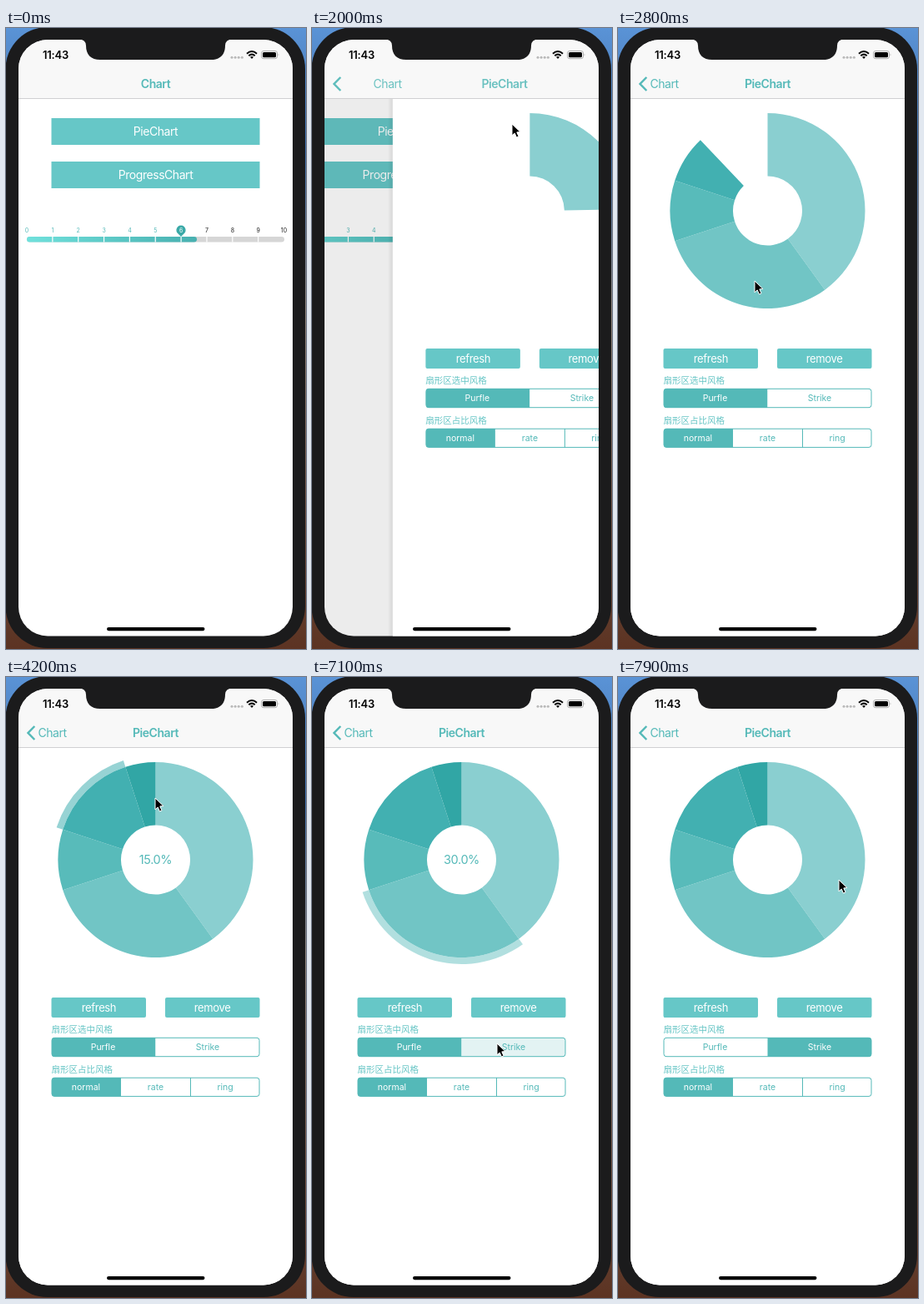
Recreate the animation shown at these times as an HTML page. Size 360 by 744 pixels, loop 8000 ms.

```html
<!DOCTYPE html>
<html lang="en">
<head>
<meta charset="utf-8">
<title>Chart demo</title>
<style>
html, body { margin: 0; width: 100%; height: 100%; overflow: hidden; }
svg { display: block; font-family: Inter, "Noto Sans CJK SC", "Noto Sans CJK", sans-serif; }
.mid { text-anchor: middle; }
.t14 { font-size: 14px; letter-spacing: -.45px; }
.t13 { font-size: 13px; letter-spacing: -.35px; }
.t10 { font-size: 10.5px; }
.tick { font-size: 7px; }
.bold { font-weight: 600; }
.teal { fill: #54b9b8; }
.btn { fill: #66c7c7; }
.white { fill: #fff; }
.cjk { font: 10.5px "Noto Sans CJK SC", "Noto Sans CJK", sans-serif; fill: #66c5c5; }
.line { fill: none; stroke: #54b9b8; }
</style>
</head>
<body>
<svg id="stage" width="360" height="744" viewBox="0 0 360 744">
  <defs>
    <linearGradient id="desk" x2="0" y2="1">
      <stop offset="0" stop-color="#5a93d6"/>
      <stop offset=".2" stop-color="#3f6da8"/>
      <stop offset=".45" stop-color="#8a8078"/>
      <stop offset="1" stop-color="#5c3322"/>
    </linearGradient>
    <linearGradient id="fill">
      <stop offset="0" stop-color="#70e1dc"/>
      <stop offset="1" stop-color="#48b0b0"/>
    </linearGradient>
    <linearGradient id="shade">
      <stop offset="0" stop-opacity="0"/>
      <stop offset="1" stop-opacity=".09"/>
    </linearGradient>
    <clipPath id="screen"><rect x="15" y="14" width="329" height="714.5" rx="35"/></clipPath>
    <clipPath id="left"><rect x="55" y="432" width="249" height="23" rx="3"/></clipPath>
    <clipPath id="low"><rect x="55" y="480" width="249" height="22.5" rx="3"/></clipPath>
  </defs>

  <rect width="360" height="744" fill="url(#desk)"/>
  <rect x="-.5" y="-1" width="359.5" height="744" rx="50" fill="#1b1b1c"/>

  <g clip-path="url(#screen)">
    <rect x="15" y="14" width="329" height="715" fill="#fff"/>
    <g id="home">
      <rect class="btn" x="54.5" y="108" width="250" height="32"/>
      <rect class="btn" x="54.5" y="160" width="250" height="32"/>
      <text class="mid t14 white" x="179.5" y="129">PieChart</text>
      <text class="mid t14 white" x="179.5" y="181">ProgressChart</text>
      <rect x="25" y="250" width="309" height="6.5" rx="3.25" fill="#d6d6d6"/>
      <rect x="25" y="250" width="204" height="6.5" rx="3.25" fill="url(#fill)"/>
      <path d="M210 250L205.6 245.6A5.6 5.6 0 1 1 214.4 245.6Z" fill="#3aa9a7"/>
      <g id="ticks"></g>
    </g>
    <rect id="dim" x="15" y="85" width="329" height="644"/>

    <g id="detail">
      <rect x="9" y="85" width="6" height="644" fill="url(#shade)"/>
      <rect x="15" y="85" width="329" height="644" fill="#fff"/>
      <g id="pie"></g>
      <path id="band" fill-opacity=".55"/>
      <text id="share" class="mid teal" x="179.5" y="224" style="font-size:14.5px;letter-spacing:-.4px"></text>

      <rect class="btn" x="54.5" y="384" width="113.5" height="24" rx="2"/>
      <rect class="btn" x="191" y="384" width="113.5" height="24" rx="2"/>
      <text class="mid t13 white" x="111.5" y="400.5">refresh</text>
      <text class="mid t13 white" x="247.5" y="400.5">remove</text>

      <text class="cjk" x="54.5" y="426">扇形区选中风格</text>
      <g clip-path="url(#left)">
        <rect id="purfleBg" x="55" y="432" width="124.5" height="23"/>
        <rect id="strikeBg" x="179.5" y="432" width="124.5" height="23"/>
      </g>
      <rect class="line" x="55" y="432.3" width="249" height="22.4" rx="3"/>
      <text id="purfle" class="mid t10" x="116.5" y="447.3">Purfle</text>
      <text id="strike" class="mid t10" x="242" y="447.3">Strike</text>

      <text class="cjk" x="54.5" y="474">扇形区占比风格</text>
      <rect class="teal" clip-path="url(#low)" x="55" y="480" width="83" height="22.5"/>
      <rect class="line" x="55" y="480.2" width="249" height="22.2" rx="3"/>
      <path class="line" d="M221.5 480V502.5"/>
      <text class="mid t10 white" x="96" y="495.2">normal</text>
      <text class="mid t10 teal" x="179.5" y="495.2">rate</text>
      <text class="mid t10 teal" x="263" y="495.2">ring</text>
    </g>

    <rect x="15" y="14" width="329" height="70.5" fill="#f8f8f8"/>
    <rect x="15" y="84" width="329" height=".8" fill="#c6c6c8"/>
    <text id="homeTitle" class="mid t14 bold teal" y="71.5">Chart</text>
    <text id="backTitle" class="mid t14 teal" y="71.5">Chart</text>
    <text id="pieTitle" class="mid t14 bold teal" y="71.5">PieChart</text>
    <path id="chevron" class="line" d="M34.3 59L26.5 67L34.3 75" stroke-width="2.5"/>

    <text class="bold" x="44" y="36.6" style="font-size:13px;letter-spacing:-.2px">11:43</text>
    <g fill="#b9b9b9">
      <circle cx="271" cy="35.3" r="1.5"/><circle cx="275.1" cy="35.3" r="1.5"/>
      <circle cx="279.2" cy="35.3" r="1.5"/><circle cx="283.3" cy="35.3" r="1.5"/>
    </g>
    <g fill="none" stroke="#000" stroke-width="2">
      <path d="M289 30.8Q295 25.2 301 30.8M291.3 33.3Q295 29.9 298.7 33.3"/>
      <path d="M293 34.8Q295 33.2 297 34.8L295 37Z" fill="#000" stroke="none"/>
    </g>
    <rect x="306.5" y="27.5" width="19" height="9.2" rx="2.6" fill="none" stroke="#a8a8a8" stroke-width=".9"/>
    <rect x="308" y="29" width="16" height="6.2" rx="1.5"/>
    <path d="M326.7 30.5Q328.2 32 326.7 33.7Z" fill="#a8a8a8"/>
    <rect x="121" y="718" width="117.5" height="4.2" rx="2.1"/>
  </g>
  <path d="M87 13Q96 14 96 21C96 32 102 38 113 38H246C257 38 263 32 263 21Q263 14 272 13Z" fill="#1b1b1c"/>

  <path id="cursor" d="M0 0V13.8L3.2 10.9L5.4 16L8 14.9L5.8 9.9L10 9.6Z" stroke="#fff" stroke-width="1"/>
</svg>

<script>
const $ = id => document.getElementById(id);
const set = (id, attrs) => { for (const k in attrs) $(id).setAttribute(k, attrs[k]); };
const clamp = v => Math.max(0, Math.min(1, v));

const LOOP = 8000, TEAL = '#54b9b8', CX = 179.5, CY = 219, INNER = 41.5, OUTER = 117;
const shares = [.4, .3, .1, .15, .05];
const colors = ['#8acfd0', '#71c5c5', '#58bbba', '#42b0b1', '#31a6a5'];
let sum = 0;
const slices = shares.map((share, i) => ({ share, color: colors[i], from: sum, to: sum += share }));

// Scale of the progress chart
for (let i = 0; i <= 10; i++) {
  const x = 25 + 30.85 * i;
  const color = i < 6 ? TEAL : i === 6 ? '#fff' : '#222';
  if (i % 10) $('ticks').innerHTML += `<rect x="${x - .6}" y="250" width="1.2" height="6.5" fill="#fff"/>`;
  $('ticks').innerHTML += `<text class="mid tick" x="${x}" y="245.2" fill="${color}">${i}</text>`;
}
$('pie').innerHTML = slices.map((s, i) => `<path id="slice${i}" fill="${s.color}"/>`).join('');

// Ring sector between two turns (0..1, clockwise from the top)
function sector(from, to, inner, outer) {
  if (to <= from) return '';
  const at = (turn, r) => {
    const a = turn * 2 * Math.PI;
    return `${CX + r * Math.sin(a)} ${CY - r * Math.cos(a)}`;
  };
  const big = +(to - from > .5);
  return `M${at(from, outer)}A${outer} ${outer} 0 ${big} 1 ${at(to, outer)}` +
    `L${at(to, inner)}A${inner} ${inner} 0 ${big} 0 ${at(from, inner)}Z`;
}

// Pointer stops: time, x, y
const stops = [
  [700, 294, 266], [1500, 240, 115], [2100, 240, 115], [2800, 164, 303],
  [3100, 150, 292], [3700, 118, 160], [3900, 118, 160], [4200, 179, 145],
  [4600, 232, 160], [4800, 232, 160], [5200, 180, 300], [5400, 180, 300],
  [5900, 246, 405], [6450, 246, 405], [7000, 222, 439], [7350, 222, 439],
  [7900, 265, 243], [8000, 265, 243]
];
function pointer(t) {
  const i = Math.max(1, stops.findIndex(s => s[0] > t));
  const [a, b] = [stops[i - 1], stops[i]];
  const u = clamp((t - a[0]) / (b[0] - a[0])), e = u * u * (3 - 2 * u);
  return [1, 2].map(k => a[k] + (b[k] - a[k]) * e);
}

function selected(t) {
  if (t < 3800 || t >= 7200) return -1;
  return t < 4800 ? 3 : t < 5400 ? 0 : 1;
}

function draw(t) {
  // Page push, settling like a critically damped spring
  const w = Math.max(0, t - 1760) * .0112;
  const p = w > 9 ? 1 : 1 - (1 + w) * Math.exp(-w);
  set('home', { transform: `translate(${-98.7 * p})` });
  set('dim', { opacity: .1 * p });
  set('detail', { transform: `translate(${329 * (1 - p)})`, visibility: p ? 'visible' : 'hidden' });
  const x = 55.5 + 124 * (1 - p) * 1.14;
  set('homeTitle', { x: Math.min(x, CX), opacity: clamp(1 - p * 1.6) });
  set('backTitle', { x: Math.min(x, CX), opacity: clamp(p * 1.15) });
  set('pieTitle', { x: CX + 207 * (1 - p), opacity: clamp(p * 1.15) });
  set('chevron', { opacity: clamp(p * 1.25) });

  const sweep = clamp(.247 + (t - 2000) * .000789);
  slices.forEach((s, i) => set('slice' + i, { d: sector(s.from, Math.min(s.to, sweep), INNER, OUTER) }));

  const s = slices[selected(t)];
  set('band', s ? { d: sector(s.from, s.to, OUTER, 125), fill: s.color } : { d: '' });
  $('share').textContent = s ? (s.share * 100).toFixed(1) + '%' : '';

  const strike = t >= 7200;
  set('purfleBg', { fill: strike ? '#fff' : TEAL });
  set('strikeBg', { fill: strike ? TEAL : t >= 7000 ? '#e3f3f3' : '#fff' });
  set('purfle', { fill: strike ? TEAL : '#fff' });
  set('strike', { fill: strike ? '#fff' : TEAL });

  set('cursor', {
    transform: `translate(${pointer(t)})`,
    visibility: t < 700 ? 'hidden' : 'visible'
  });
}

const start = performance.now();
function tick(now) {
  draw(Math.max(0, now - start) % LOOP);
  requestAnimationFrame(tick);
}
draw(0);
requestAnimationFrame(tick);
</script>
</body>
</html>
```
